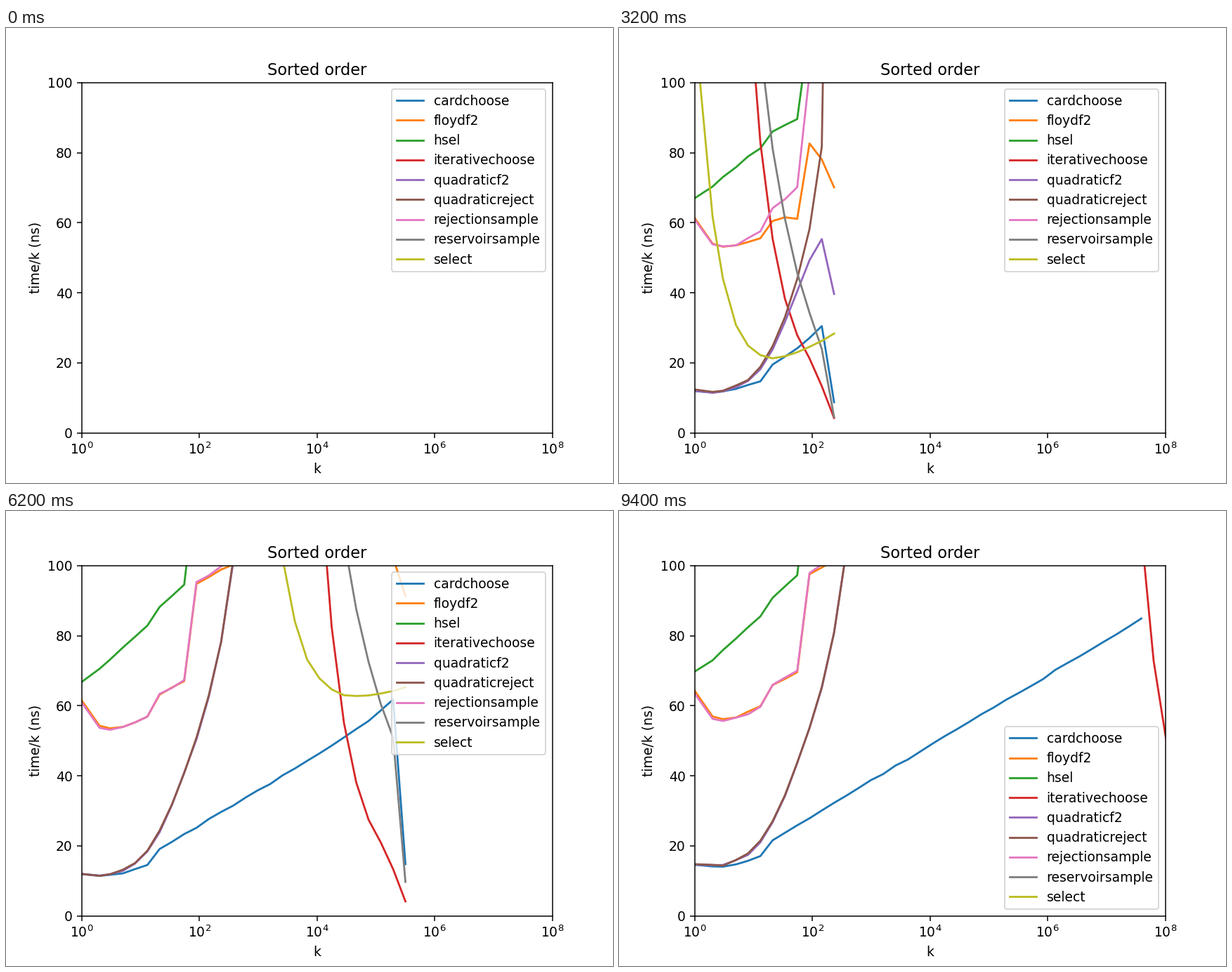
These frames come from a looping animation (864x648 px, 9600 ms). A matplotlib script:

```python
import numpy as np
import matplotlib.pyplot as plt
from matplotlib.animation import FuncAnimation

FRAMES = 48
PHI = (1 + 5 ** 0.5) / 2
NAMES = ["cardchoose", "floydf2", "hsel", "iterativechoose", "quadraticf2",
         "quadraticreject", "rejectionsample", "reservoirsample", "select"]

fib = [1, 2]
while len(fib) < FRAMES:
    fib.append(fib[-1] + fib[-2])


def log_phi(x):
    return np.log(x) / np.log(PHI)


def ramp(x, start, end):
    return np.clip((x - start) / (end - start), 0, 1)


def harmonic(m):
    safe = np.maximum(m, 1)
    h = np.log(safe) + 0.5772 + 0.5 / safe - 1 / (12 * safe ** 2)
    return np.where(m < 0.5, 0, h)


def sizes(frame):
    """Every k timed for this frame's n; the last one is n itself."""
    ks = range(1, frame + 2) if frame < 10 else fib[:frame - 4]
    return np.array(ks, float)


def costs(frame):
    """Time per item of each method, in the order of NAMES."""
    k = sizes(frame)
    n = k[-1]
    p, r = k / n, n / k
    pos = np.maximum(log_phi(k * 5 ** 0.5) - 2, 0)  # Fibonacci index of k
    tries = (harmonic(n) - harmonic(n - k)) * r - 1
    grow = ramp(frame, 8, 16)
    late = max(frame - 8, 0)
    tired = ramp(frame, 41, 47)
    slow = 2.7 * tired
    mid, big = k > 16, k > 60  # table sizes at which the cost jumps

    card = np.where(mid, 6.4 + 2.1 * pos, 11 + 0.14 * pos ** 2 + 1 / k ** 2)
    card += 5 * p * min(1, frame / 16)
    full = 8 + 0.1 * np.exp(0.137 * frame)
    card += (full - card) * ramp(p, 0.78, 1)
    card[k > 4e7] = np.nan

    table = 46.7 + 2 * pos + 14.8 / k ** 1.5 + 4.3 * mid + 25.7 * big
    floyd = table * (1 - 0.29 * p ** 0.85)
    reject = (table - 0.8 + 0.15 * pos) * (1 + 0.3 * tries)

    hsel = 67 + 3.2 * pos + 2 * mid + 27 * big
    hsel *= 1 - 0.15 * p ** 0.7 * (1 - 1 / k)

    miss = np.minimum(1, 1.65 * (1 - p))
    iterative = (4 * r + 10.7 * miss + 6 / k) * (1 + 0.33 * tired)

    quad = 10.5 + 33.5 / (1 + np.exp((7.15 - pos) / 1.4)) + 0.155 * k + 1 / k ** 2
    quad_f2 = quad * (1 - 0.49 * grow * p ** 3)
    quad_reject = (quad + 0.2) * (1 + (1.05 - 0.5 * grow) * tries)

    reservoir = (1.7 + 0.35 * late + 3.3 * (r - 1) + 13.3 * np.log(r)
                 + 1.42 * late * np.minimum(1, (1 - p) / 0.382))

    tilt = 0.0085 * (frame - 19) ** 2 - 2.4
    select = (14.6 + 1.4 * late + 0.034 * late ** 2 + 0.385 * r
              + tilt * np.minimum(log_phi(r), 8.5) + 18 / k)

    rows = [card + slow, floyd + slow, hsel + slow, iterative, quad_f2 + slow,
            quad_reject + slow, reject + slow, reservoir, select]
    rng = np.random.default_rng(frame)
    return k, [np.maximum(y + rng.normal(0, 0.15, len(k)), 1.5) for y in rows]


def legend_place(frame):
    if frame < 32:
        return "upper right"
    return "upper center" if 37 <= frame <= 42 else "lower right"


fig, ax = plt.subplots(figsize=(6.4, 4.8), dpi=135)
ax.set_xscale("log")
ax.set_xlim(1, 1e8)
ax.set_ylim(0, 100)
ax.set_xticks([1, 1e2, 1e4, 1e6, 1e8])
ax.minorticks_off()
ax.set_title("Sorted order")
ax.set_xlabel("k")
ax.set_ylabel("time/k (ns)")
lines = [ax.plot([], [], label=name)[0] for name in NAMES]
legend = ax.legend(loc="upper right", labelspacing=0.493)


def draw(frame):
    k, rows = costs(frame)
    for line, y in zip(lines, rows):
        line.set_data(k, y)
    legend.set_loc(legend_place(frame))
    return lines + [legend]


anim = FuncAnimation(fig, draw, frames=FRAMES, interval=200, repeat=True,
                     repeat_delay=0, blit=False)
plt.show()
```
